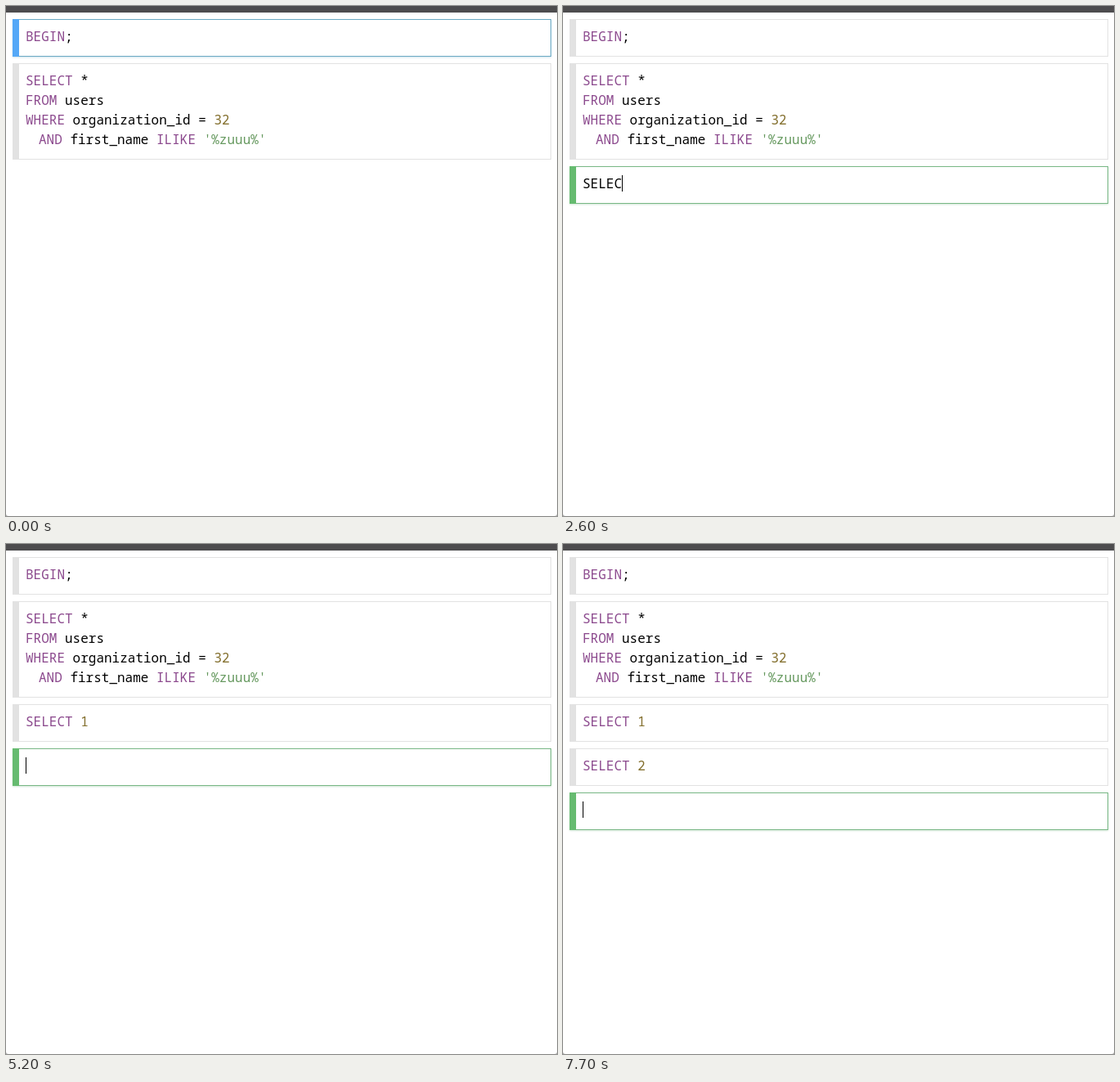
An HTML page that plays this animation: 674x624 px, repeating every 8 s.

```html
<!DOCTYPE html>
<html lang="en">
<head>
<meta charset="utf-8">
<style>
  html, body { margin: 0; width: 100%; height: 100%; overflow: hidden; background: #aaa; }
  #page {
    position: relative; box-sizing: border-box; width: 674px; height: 624px;
    padding: 8px 7px 0 8px; border-top: 8px solid #4d4c4e;
    border-radius: 0 0 3px 3px; background: #fff;
  }
  .cell {
    position: relative; box-sizing: border-box; min-height: 46px; margin-bottom: 8px;
    padding: 8px 8px 12px 15px; border: 1px solid #e2e2e2;
    font: 16px/24px "Noto Sans Mono", "DejaVu Sans Mono", monospace;
    color: #000; white-space: pre;
  }
  .cell::before {
    content: ""; position: absolute; left: -1px; top: -1px; bottom: -1px;
    width: 8px; background: #e2e2e2;
  }
  .cell.blue { border-color: #6caac4; box-shadow: 0 1px 2px #6caac455; }
  .cell.blue::before { background: #54a8f7; }
  .cell.green { border-color: #78b785; box-shadow: 0 1px 2px #78b78555; }
  .cell.green::before { background: #66bb70; }
  .indent { padding-left: 16px; }
  .caret {
    position: absolute; top: 10px; width: 1px; height: 20px; background: #000;
  }
  b { font-weight: normal; color: #8c4a8e; }
  i { font-style: normal; color: #836f2d; }
  q { quotes: none; color: #66995f; }
</style>
</head>
<body>
<div id="page">
  <div class="cell"><b>BEGIN</b>;</div>
  <div class="cell"><b>SELECT</b> *
<b>FROM</b> users
<b>WHERE</b> organization_id = <i>32</i>
<span class="indent"><b>AND</b> first_name <b>ILIKE</b> <q>'%zuuu%'</q></span></div>
  <div class="cell"></div>
  <div class="cell"></div>
  <div class="cell"></div>
</div>
<script>
const LOOP = 8000, CHAR = 9.6;
const cells = [...document.querySelectorAll(".cell")];

// open: editing starts, run: query is executed, keys: time of each keystroke,
// blinks: times at which the caret toggles
const edits = [
  { text: "SELECT 1", open: 1800, run: 5100,
    keys: [2100, 2300, 2400, 2500, 2600, 2900, 3100, 3400],
    blinks: [3900, 4500, 5000] },
  { text: "SELECT 2", open: 5200, run: 7600,
    keys: [5800, 5900, 6000, 6100, 6200, 6300, 6300, 6500],
    blinks: [5700, 5800, 7000, 7500] },
  { text: "", open: 7700, run: Infinity, keys: [], blinks: [] }
];

const passed = (times, t) => times.filter(time => time <= t).length;

function content({ text, run, keys, blinks }, t) {
  if (t >= run) return text.replace(/(\w+) (\d)/, "<b>$1</b> <i>$2</i>");
  const count = passed(keys, t);
  const caret = passed(blinks, t) % 2 ? "" :
    `<span class="caret" style="left:${15 + Math.round(count * CHAR)}px"></span>`;
  return text.slice(0, count) + caret;
}

function draw(t) {
  let active = t < 1000 ? 0 : 1, color = "blue";
  edits.forEach((edit, i) => {
    const cell = cells[i + 2], open = t >= edit.open;
    cell.style.visibility = open ? "visible" : "hidden";
    const html = open ? content(edit, t) : "";
    if (cell.shown !== html) cell.innerHTML = cell.shown = html;
    if (open) {
      active = i + 2;
      color = t < edit.run ? "green" : "blue";
    }
  });
  cells.forEach((cell, i) => cell.className = i === active ? "cell " + color : "cell");
}

const start = performance.now();
function tick() {
  draw((performance.now() - start) % LOOP);
  requestAnimationFrame(tick);
}
tick();
</script>
</body>
</html>
```
